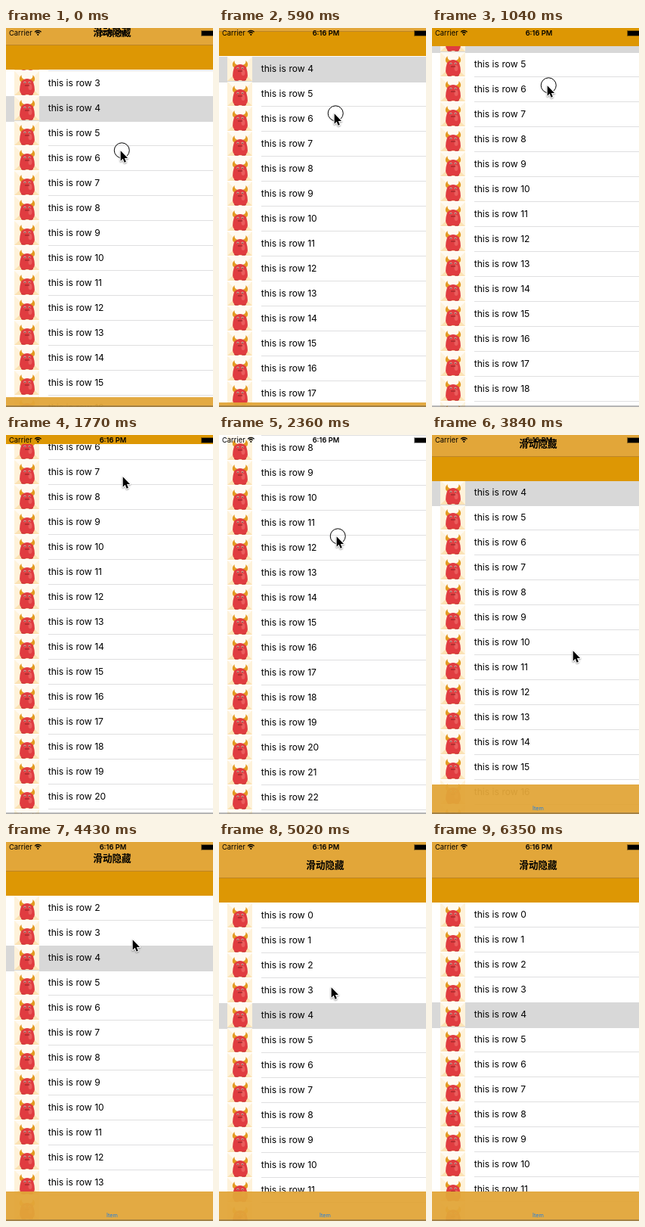
An HTML page with a canvas that plays this animation: 274x501 px, repeating every 6650 ms.

```html
<!DOCTYPE html>
<html lang="zh">
<head>
<meta charset="utf-8">
<title>滑动隐藏</title>
<style>
html, body { margin: 0; width: 100%; height: 100%; overflow: hidden; background: #fff; }
canvas { display: block; width: 274px; height: 501px; }
</style>
</head>
<body>
<canvas id="stage"></canvas>
<script>
const W = 274, H = 501, ROW = 33, SELECTED = 4;
const LOOP = 6650, BEATS = 45, BEAT = LOOP / BEATS;
const SOLID = '#dd9704', BAR = '#e2a639';
const SANS = 'Inter, "Noto Sans", sans-serif';
const CJK = '"Noto Sans CJK SC", "Noto Sans CJK", sans-serif';

// Key poses by beat; lift raises the pointer on its way to the next pose
const poses = [
  { at: 0, list: -42, nav: 22, tab: 488, x: 151, y: 161, down: true },
  { at: 7, list: -133, nav: -9, tab: H, x: 152, y: 75 },
  { at: 8, list: -133, nav: -9, tab: H, x: 152, y: 75, lift: 50 },
  { at: 16, list: -263, nav: -33, tab: H, x: 155, y: 133, down: true },
  { at: 21, list: -162, nav: 0, tab: 464, x: 163, y: 232, down: true },
  { at: 24, list: -72, nav: 28, tab: 462, x: 186, y: 284 },
  { at: 26, list: -72, nav: 28, tab: 462, x: 186, y: 284, lift: 110 },
  { at: 34, list: 81, nav: 47, tab: 462, x: 148, y: 191 },
  { at: 41, list: 80, nav: 47, tab: 462, x: 236, y: 435 },
  { at: 43, list: 80, nav: 47, tab: 462, x: 256, y: 505 }
];

const canvas = document.getElementById('stage');
const ctx = canvas.getContext('2d');
const dpr = window.devicePixelRatio || 1;
canvas.width = W * dpr;
canvas.height = H * dpr;

function pose(beat) {
  const i = poses.findLastIndex(p => p.at <= beat);
  const a = poses[i], b = poses[i + 1];
  if (!b) return a;
  const p = (beat - a.at) / (b.at - a.at);
  const eased = a.lift ? p * p * (3 - 2 * p) : p;
  const mix = (key, k) => Math.round(a[key] + (b[key] - a[key]) * k);
  return {
    list: mix('list', eased),
    nav: mix('nav', eased),
    tab: mix('tab', eased),
    x: mix('x', p),
    y: mix('y', p) - (a.lift || 0) * Math.sin(Math.PI * p),
    down: a.down || (i + 1 < poses.length && a.at === 7)
  };
}

function rect(x, y, w, h, fill) {
  ctx.fillStyle = fill;
  ctx.fillRect(x, y, w, h);
}

function text(s, x, y, font, align = 'left', fill = '#000') {
  ctx.font = font;
  ctx.textAlign = align;
  ctx.fillStyle = fill;
  ctx.fillText(s, x, y);
}

function oval(x, y, rx, ry, fill) {
  ctx.fillStyle = fill;
  ctx.beginPath();
  ctx.ellipse(x, y, rx, ry, 0, 0, 7);
  ctx.fill();
}

function shape(d, fill) {
  ctx.fillStyle = fill;
  ctx.fill(new Path2D(d));
}

function monster(y) {
  ctx.save();
  ctx.translate(11, y);
  rect(0, 0, 33, 32, '#fef2da');
  shape('M0 0H33L17 16Z', '#fffaf1');
  shape('M0 32L17 16L33 32Z', '#fbe2b4');
  ctx.translate(17, 0);
  for (const side of [1, -1]) {
    ctx.scale(side, 1);
    shape('M3 11Q8 10 7.500 5Q11.500 9 9.500 13Q8 15 4 14Z', '#e39a22');
    oval(4.500, 30, 3.500, 1.8, '#c52f34');
  }
  shape('M-8 14Q0 6 8 14Q12 27 7.500 30Q0 32 -7.500 30Q-12 27 -8 14Z', '#e03c40');
  oval(-4, 21, 2.500, 4, '#ea5c5c');
  for (const x of [-3, 3]) {
    oval(x, 15, 1.5, 1.2, '#f3c9b8');
    oval(x, 15.300, 0.8, 0.8, '#4a1518');
  }
  rect(-3, 18.500, 6, 1, '#8c2023');
  ctx.restore();
}

function list({ list: offset, nav, tab }) {
  const top = Math.max(0, nav + ROW);
  ctx.save();
  ctx.beginPath();
  ctx.rect(0, top, W, H - top);
  ctx.clip();
  for (let i = Math.max(0, Math.floor((top - offset) / ROW)); offset + i * ROW < H; i++) {
    const y = offset + i * ROW;
    if (i === SELECTED) rect(0, y, W, ROW + 1, '#d8d8d8');
    else if (i !== SELECTED - 1) rect(56, y + ROW - 1, W - 56, 1, '#dfdfe0');
    monster(y);
    if (y < tab) text('this is row ' + i, 55.700, y + 20.300, '12.15px ' + SANS);
  }
  ctx.restore();
}

function navBar({ nav }) {
  rect(0, 0, W, nav + ROW, SOLID);
  if (nav <= 0) return;
  rect(0, 0, W, nav, BAR);
  rect(0, nav, W, 1, '#bd8526');
  text('滑动隐藏', 140.500, nav - 12.500, '700 12.6px ' + CJK, 'center');
}

function statusBar() {
  text('Carrier', 4, 9.800, '9.4px ' + SANS);
  text('6:16 PM', 141.500, 9.800, '600 9.3px ' + SANS, 'center');
  ctx.strokeStyle = '#000';
  ctx.lineWidth = 1.3;
  for (const r of [3.300, 5.800]) {
    ctx.beginPath();
    ctx.arc(42.300, 9.300, r, -Math.PI * 0.76, -Math.PI * 0.24);
    ctx.stroke();
  }
  oval(42.300, 8.800, 1.1, 1.1, '#000');
  rect(258, 3, 20, 8, 'rgba(0, 0, 0, 0.35)');
  rect(259, 4, 20, 6, '#000');
}

function tabBar({ tab }) {
  ctx.globalAlpha = 0.95;
  rect(0, tab, W, H - tab, BAR);
  ctx.globalAlpha = 1;
  text('Item', 140.500, tab + 34.300, '7.3px ' + SANS, 'center', '#2481e0');
}

function pointer({ x, y, down }) {
  if (down) {
    ctx.strokeStyle = '#000';
    ctx.lineWidth = 1;
    ctx.beginPath();
    ctx.arc(x + 2.300, y + 0.800, 10, 0, 7);
    ctx.stroke();
  }
  const arrow = new Path2D('M0 0V13.500L3 10.600L5 15.500L7.200 14.600L5.200 9.800H9.400Z');
  ctx.save();
  ctx.translate(x + 0.700, y + 1.200);
  ctx.lineJoin = 'round';
  ctx.lineWidth = 2.2;
  ctx.strokeStyle = '#fff';
  ctx.shadowColor = 'rgba(0, 0, 0, 0.4)';
  ctx.shadowBlur = 2 * dpr;
  ctx.shadowOffsetY = dpr;
  ctx.stroke(arrow);
  ctx.shadowColor = 'transparent';
  ctx.fillStyle = '#000';
  ctx.fill(arrow);
  ctx.restore();
}

function draw(now) {
  // Each pose is held for one beat
  const state = pose(Math.floor((now % LOOP + 20) / BEAT) % BEATS);
  ctx.setTransform(dpr, 0, 0, dpr, 0, 0);
  rect(0, 0, W, H, '#fff');
  list(state);
  navBar(state);
  statusBar();
  tabBar(state);
  rect(0, H - 2, W, 2, 'rgba(70, 70, 70, 0.4)');
  pointer(state);
}

// The opening pose shows from the first moment
const start = performance.now();
function tick() {
  draw(performance.now() - start);
  requestAnimationFrame(tick);
}
tick();
</script>
</body>
</html>
```
